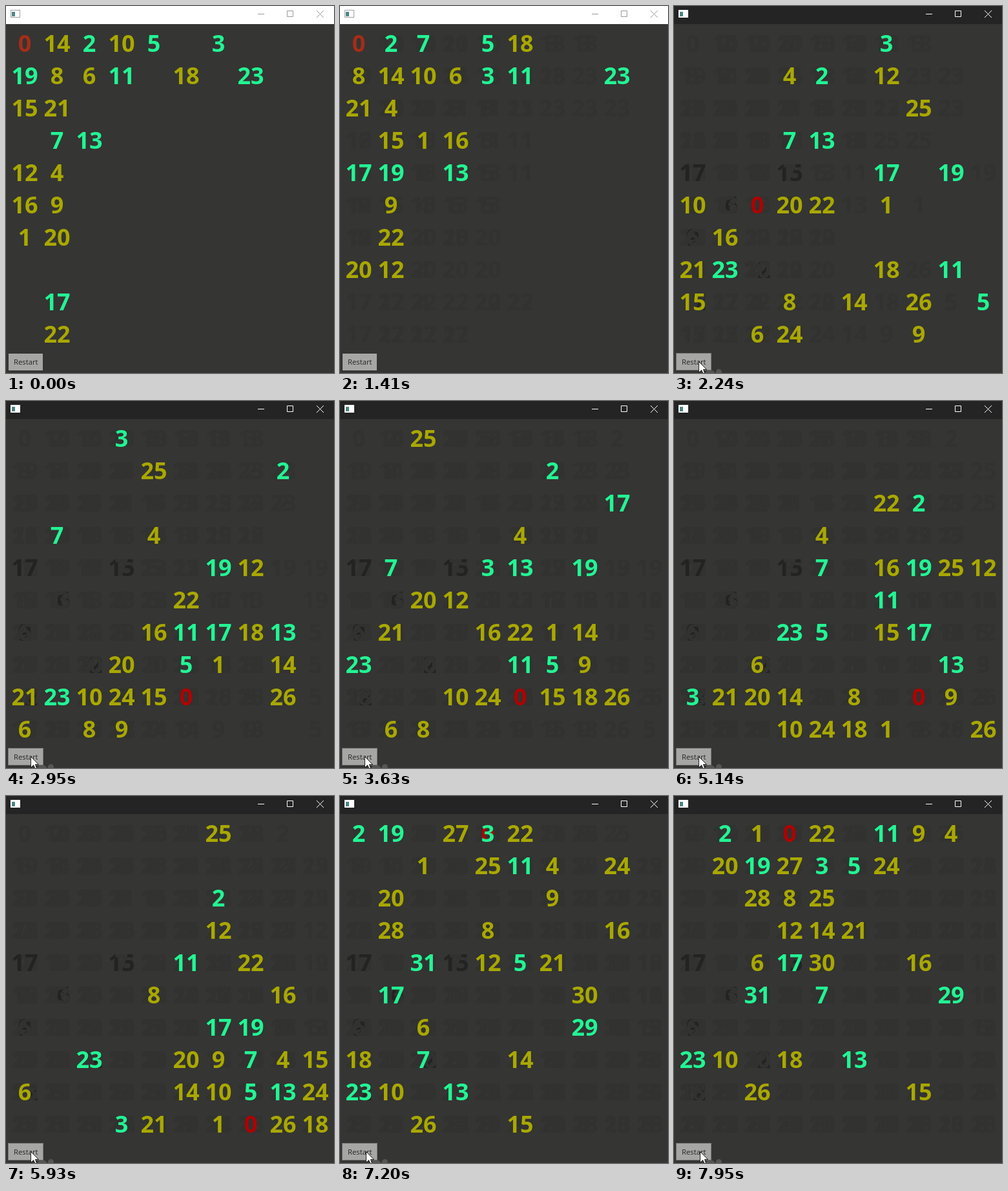
These frames come from a looping animation (508 px wide and 568 px high, 8000 ms). An HTML page with a canvas:

```html
<!DOCTYPE html>
<html lang="en">
<head>
<meta charset="utf-8">
<title>Wandering numbers</title>
<style>
  html, body { margin: 0; width: 100%; height: 100%; overflow: hidden; background: #353533; }
  canvas { display: block; width: 508px; height: 568px; }
</style>
</head>
<body>
<canvas id="stage" width="508" height="568"></canvas>
<script>
const LOOP = 8000, TICK = 42.35, SIZE = 10;
const FOCUS_TICK = 50, RESTART_2 = 163;
const FONT = '"Open Sans", "Noto Sans", sans-serif';
const COLOR = { back: '#353533', trail: '#323231', dark: '#232323', prime: '#22f594', plain: '#a9a800' };
const ctx = document.getElementById('stage').getContext('2d');

// Poses: one line per row, a dot for an empty cell, "+" for shared cells.
const calm = parse(`0 14 2 10 5 . 3
19 8 6 11 . 18 . 23
15 21
. 7 13
12 4
16 9
1 20
.
. 17
. 22`);
const gathered = parse(`0 2 7 . 5 18
8 14 10 6 3 11 . . 23
21 4
. 15 1 16
17 19 . 13
. 9
. 22
20 12`);
const scattered = parse(`. . . 3
. . . . 25 . . . 2
.
. 7 . . 4
. . . . . . 19 12
. . . . . 22
. . . . 16 11 17 18 13
. . . 20 . 5 1 . 14
21 23 10 24 15 0 . . 26
6 . 8 9`);
const closing = parse(`. . . . . . . 22
. . . . . . . . 25
.
. . . . . . 4 . 2
. . . 7
. . . . . . . . 12
. . . 11 . . 19 16
3 . 23 . 5 . 17 15 13
. . . 6 20 8 14 0 9
. . . 21 10 . 24 1 26 18`);
const corner = parse(`. . . . . . 25
.
. . . . . . 2
. . . . . . 12
. . . . . 11 . 22
. . . . 8 . . . 16
. . . . . . 17 19
. . 23 . . 20 9 7 4 15
6 . . . . 14 10 5 13 24
. . . 3 21 . 1 0 26 18`);
const fresh = parse(`2 19 . 27 0+3 22
. . 1 . 25 11 4 . 24
. 20 . . . . 9
. 28 . . 8 . . . 16
. . 31 . 12 5 21
. 17 . . . . . 30
. . 6 . . . . 29
18 . 7 . . 14
23 10 . 13
. . 26 . . 15`);
const rising = parse(`. 2 1 0 22 . 11 9 4
. 20 19 27 3 5 24
. . 28 8 25
. . . 12 14 21
. . 6 17 30 . . 16
. . 31 . 7 . . . 29
.
23 10 . 18 . 13
. . 26 . . . . 15`);

// Dark leftovers of the first board: value, column, row, value covering it.
const leftovers = [[17, 0, 4], [15, 3, 4, 7], [6, 1.2, 5, 3], [9, 0, 6, 6], [22, 2, 7, 20], [12, 0, 8, 18]];

let seed = 71;
function random() {
  seed = (seed * 1664525 + 1013904223) >>> 0;
  return seed / 4294967296;
}

function parse(text) {
  const board = [];
  text.split('\n').forEach((line, y) => line.split(' ').forEach((cell, x) => {
    for (const n of cell.match(/\d+/g) || []) board[n] = [x, y];
  }));
  return board;
}

const inside = ([x, y]) => x >= 0 && y >= 0 && x < SIZE && y < SIZE;
const isFree = (board, [x, y]) => !board.some(c => c && c[0] === x && c[1] === y);

// A random layout within reach of the given one.
function spread(board, reach) {
  const out = [];
  const shift = () => Math.floor(random() * (2 * reach + 1)) - reach;
  board.forEach(([x, y], n) => {
    let cell = [x, y];
    for (let i = 0; i < 20; i++) {
      const next = [x + shift(), y + shift()];
      if (inside(next) && isFree(out, next)) { cell = next; break; }
    }
    out[n] = cell;
  });
  return out;
}

// Random walk of all numbers that reaches the goal on the given tick.
function walk(goal, endTick) {
  while (frames.length <= endTick) {
    const left = endTick - frames.length + 1;
    const board = frames[frames.length - 1].slice();
    board.forEach(([x, y], n) => {
      const dx = goal[n][0] - x, dy = goal[n][1] - y;
      const dist = Math.abs(dx) + Math.abs(dy);
      let options = [];
      if (dist >= left * 0.45) {
        if (dx) options.push([x + Math.sign(dx), y]);
        if (dy) options.push([x, y + Math.sign(dy)]);
      } else if (n && left > 1 && random() < 0.3) {
        options = [[x + 1, y], [x - 1, y], [x, y + 1], [x, y - 1]].filter(inside);
      }
      const skip = Math.floor(random() * options.length);
      options = [...options.slice(skip), ...options.slice(0, skip)];
      const next = options.find(c => isFree(board, c)) || (dist >= left && options[0]);
      if (next) board[n] = next;
    });
    frames.push(board);
  }
}

const frames = [calm];
walk(gathered, 33);
walk(gathered, FOCUS_TICK - 1);
frames.push(spread(scattered, 3));
walk(scattered, 70);
walk(closing, 102);
walk(corner, 140);
walk(corner, RESTART_2 - 1);
frames.push(spread(fresh, 2));
walk(fresh, 170);
walk(rising, 188);

// Faint marks stay in every cell a number has left.
const marks = [];
const seen = new Set();
frames.forEach((board, tick) => board.forEach((cell, n) => {
  const key = n + ':' + cell;
  if (seen.has(key)) return;
  seen.add(key);
  marks.push({ tick, n, cell });
}));

function isPrime(n) {
  for (let d = 2; d * d <= n; d++) if (n % d === 0) return false;
  return n > 1;
}

function drawNumber(n, [x, y], color) {
  ctx.fillStyle = color;
  ctx.fillText(n, 29 + 50 * x, 71 + 50 * y);
}

function box(color, x, y, w, h) {
  ctx.fillStyle = color;
  ctx.fillRect(x, y, w, h);
}

function drawTitleBar(active) {
  box(active ? '#242424' : '#ffffff', 0, 0, 508, 28);
  box(active ? '#ffffff' : '#a0a0a0', 7, 6, 15, 12);
  box('#ffffff', 8, 7, 13, 10);
  box('#4f8584', 9, 9, 5, 7);
  ctx.strokeStyle = active ? '#ffffff' : '#999999';
  ctx.lineWidth = 1;
  ctx.beginPath();
  ctx.moveTo(390, 12.5); ctx.lineTo(400, 12.5);
  ctx.rect(435.5, 7.5, 9, 9);
  ctx.moveTo(481, 7); ctx.lineTo(492, 18);
  ctx.moveTo(492, 7); ctx.lineTo(481, 18);
  ctx.stroke();
}

function drawButton(hover) {
  if (hover) box('#777775', 3, 537, 55, 27);
  box('#a6a6a4', 4, 538, 53, hover ? 25 : 26);
  ctx.font = '11.3px ' + FONT;
  ctx.textAlign = 'left';
  ctx.fillStyle = '#262626';
  ctx.fillText('Restart', 12, 555);
}

function drawCursor(x, y) {
  ctx.beginPath();
  [[0, 0], [0, 17], [4, 13], [7, 19], [9, 18], [7, 12], [12, 12]]
    .forEach(([dx, dy]) => ctx.lineTo(x + dx + 0.5, y + dy + 0.5));
  ctx.closePath();
  ctx.fillStyle = '#ffffff';
  ctx.fill();
  ctx.strokeStyle = '#222222';
  ctx.stroke();
}

function drawSmudge() {
  ctx.fillStyle = '#555553';
  ctx.beginPath();
  ctx.ellipse(69.5, 566, 4.5, 4, 0, 0, 7);
  ctx.ellipse(56, 568, 7, 4.5, 0, 0, 7);
  ctx.fill();
}

function drawLeftovers() {
  for (const [n, x, y, cover] of leftovers) {
    drawNumber(n, [x, y], COLOR.dark);
    if (cover) drawNumber(cover, [x, y], COLOR.trail);
  }
}

function draw(tick) {
  const active = tick >= FOCUS_TICK;
  box(COLOR.back, 0, 0, 508, 568);
  ctx.font = 'bold 36px ' + FONT;
  ctx.textAlign = 'center';
  for (const m of marks) if (m.tick < tick) drawNumber(m.n, m.cell, COLOR.trail);
  if (active) drawLeftovers();
  frames[tick].forEach((cell, n) => {
    const zero = active ? '#b20000' : '#a52d18';
    drawNumber(n, cell, n === 0 ? zero : isPrime(n) ? COLOR.prime : COLOR.plain);
  });
  drawTitleBar(active);
  const arriving = FOCUS_TICK - tick;
  drawButton(arriving <= 2);
  if (arriving <= 2) drawSmudge();
  if (arriving <= 4) {
    const away = Math.max(0, arriving - 1);
    drawCursor((tick < RESTART_2 ? 38 : 40) + 8 * away, 550 + 5 * away);
  }
}

const start = performance.now();
let shown = -1;
function play() {
  const time = (performance.now() - start) % LOOP;
  const tick = Math.min(frames.length - 1, Math.floor((time + 15) / TICK));
  if (tick !== shown) draw(shown = tick);
  requestAnimationFrame(play);
}
play();
</script>
</body>
</html>
```
